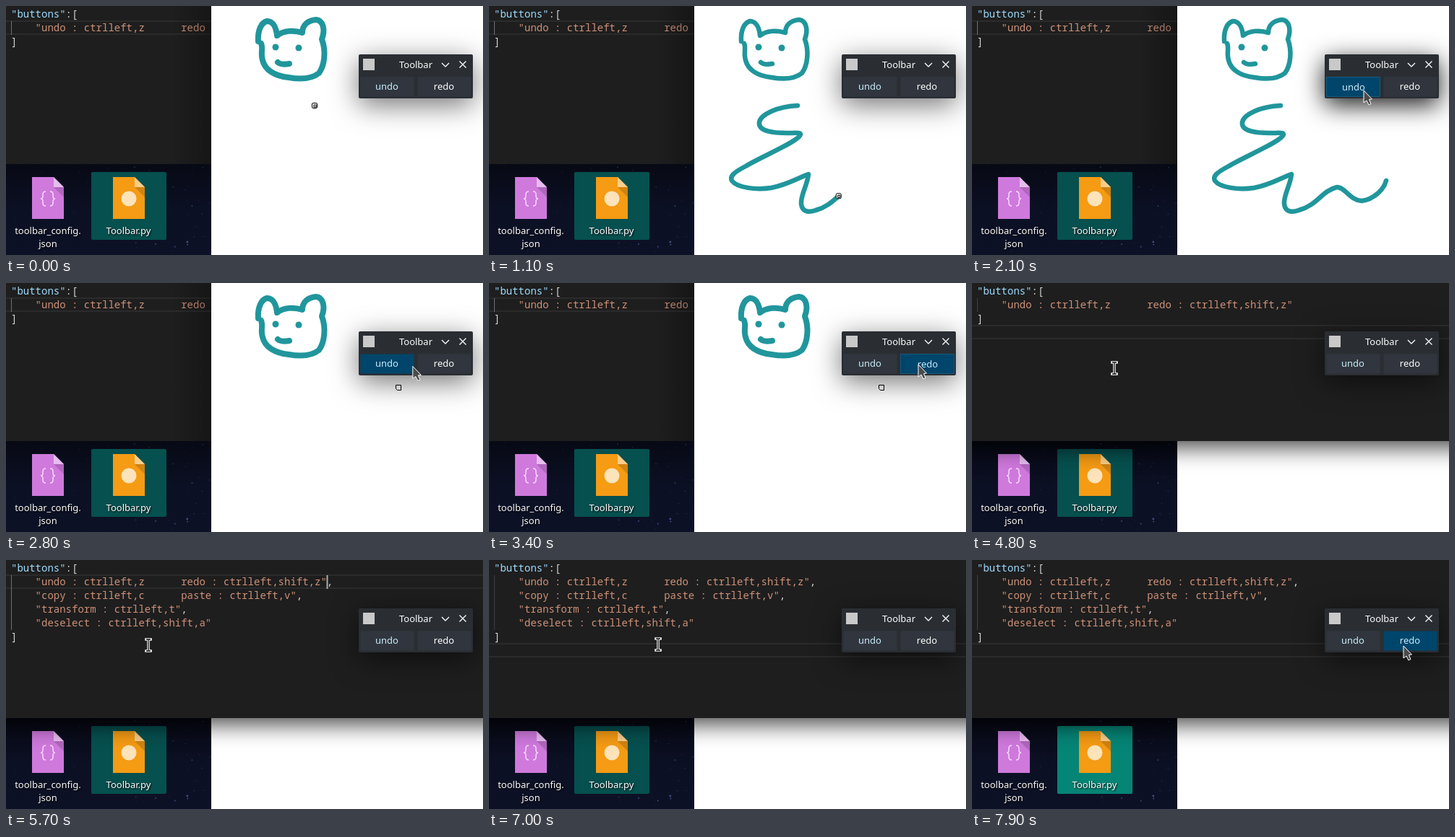
Write an HTML page that moves like this. It is 660x345 px and loops after 8000 ms.

```html
<!DOCTYPE html>
<html lang="en">
<head>
<meta charset="utf-8">
<title>Toolbar demo</title>
<style>
  html, body { margin: 0; width: 100%; height: 100%; overflow: hidden; background: #fff; }
  svg { display: block; }
  text { font: 13px "Noto Sans", sans-serif; fill: #fcfcfc; text-anchor: middle; }
  #code text { font: 14px "Noto Sans Mono", monospace; fill: #d4d4d4; text-anchor: start; white-space: pre; }
  #code .key { fill: #9cdcfe; }
  #code .str { fill: #ce9178; }
  .ink { fill: none; stroke: #20969c; stroke-linecap: round; stroke-linejoin: round; }
  .label { filter: drop-shadow(1px 1px 1px #000); }
  .button rect { fill: #31363e; }
  .button.hover rect { fill: #00456b; }
  .button.pressed rect { stroke: #1679ae; stroke-dasharray: 1 1; }
  .button.pressed text { transform: translate(1px, 1px); }
  .button.hover text, #undo text { fill: #c8ecfa; }
</style>
</head>
<body>
<svg id="stage" width="660" height="345" viewBox="0 0 660 345">
  <defs>
    <linearGradient id="night" x2="0" y2="1">
      <stop stop-color="#070914"/><stop offset=".5" stop-color="#0c1024"/><stop offset="1" stop-color="#0d1126"/>
    </linearGradient>
    <linearGradient id="edge">
      <stop stop-color="#000" stop-opacity="0"/><stop offset="1" stop-color="#000" stop-opacity=".28"/>
    </linearGradient>
    <g id="file">
      <path d="M0 0H30L44 14V58H0Z"/>
      <path d="M30 14H44V28Z" fill="#000" opacity=".15"/>
      <path d="M30 0L44 14H30Z" fill="#fff" opacity=".5"/>
    </g>
  </defs>

  <g id="desktop">
    <rect y="219" width="284" height="126" fill="url(#night)"/>
    <g id="stars" fill="#5d6db0"></g>
    <rect id="selected" x="118" y="230" width="104" height="94" rx="2"/>
    <use href="#file" x="36" y="237" fill="#cf79dd"/>
    <path d="M55 257q-4 0-4 4v2q0 4-3 4q3 0 3 4v2q0 4 4 4M61 257q4 0 4 4v2q0 4 3 4q-3 0-3 4v2q0 4-4 4" fill="none" stroke="#f6dcf9" stroke-width="1.5"/>
    <use href="#file" x="148" y="237" fill="#f59b14"/>
    <circle cx="170" cy="267" r="10.5" fill="#fce3b9"/>
    <g class="label">
      <text x="58" y="316">toolbar_config.</text>
      <text x="58" y="334">json</text>
      <text x="169.500" y="316">Toolbar.py</text>
    </g>
  </g>

  <g id="editor">
    <rect id="pane" x="-60" y="-60" width="780" height="279" fill="#1e1e1e"/>
    <path id="current" d="M0 0H660M0 18H660" stroke="#2b2b2b" stroke-width="2"/>
    <path id="guide" stroke="#404040"/>
    <g id="code"></g>
    <path id="caret" d="M444.500 21V40" stroke="#aeafad" stroke-width="2"/>
  </g>

  <g id="paper">
    <rect x="230" width="54" height="219" fill="url(#edge)"/>
    <rect x="284" width="376" height="345" fill="#fff"/>
    <g id="face" class="ink">
      <path d="M349 49C348 34 353 23 361 21C370 21 374 31 375 41C384 34 398 33 410 37C410 26 418 20 429 19C439 20 442 33 437 46C443 62 441 82 433 93C423 101 408 102 391 99C371 97 358 88 355 75C352 65 356 58 353 52"/>
      <path d="M376 78Q380 82 392 80"/>
      <g fill="#20969c" stroke="none"><circle cx="373" cy="57" r="4.500"/><circle cx="405" cy="58" r="4.500"/></g>
    </g>
    <path id="squiggle" class="ink" stroke-width="6.500" d="M427 138C400 139 376 150 374 161C372 174 395 176 412 176C425 176 431 175 431 178C428 188 380 207 355 222C338 231 333 236 336 242C343 252 370 255 390 252C412 248 428 238 442 233C441 247 431 262 432 274C433 284 440 287 452 283C478 276 484 256 505 251C516 251 523 269 539 270C556 268 570 254 573 242"/>
    <g id="leftover" fill="#fff" stroke="#000"><path d="M539.500 141.500H546.500V148.500H541.500L539.500 146.500Z"/></g>
  </g>

  <g id="toolbar">
    <rect x="488" y="67" width="158" height="61" rx="2" fill="#2a2e33"/>
    <rect x="494" y="73" width="16" height="16" fill="#c9c9c9"/>
    <text x="567" y="86">Toolbar</text>
    <path d="M603 79L608 84L613 79M627.500 76.500L636.500 85.500M636.500 76.500L627.500 85.500" fill="none" stroke="#fcfcfc" stroke-width="1.300"/>
    <g class="button" id="undo"><rect x="490.500" y="98.500" width="74" height="27"/><text x="527" y="116">undo</text></g>
    <g class="button" id="redo"><rect x="569.500" y="98.500" width="74" height="27"/><text x="606" y="116">redo</text></g>
  </g>

  <g id="brush" fill="#fff" stroke="#000"><rect x="-3.500" y="-3.500" width="7" height="7" rx="1.500"/><rect x="-1" y="-1" width="3" height="3"/></g>
  <path id="arrow" d="M0 0V17L4 14L7 20L10 18.500L7.500 12.500L11.500 12Z" fill="#4b4b4b" stroke="#fff"/>
  <g id="beam" fill="none">
    <path d="M-3 -8H3M0 -8V8M-3 8H3" stroke="#fff" stroke-width="3.500" stroke-linecap="square"/>
    <path d="M-3 -8H3M0 -8V8M-3 8H3" stroke="#111" stroke-width="1.300"/>
  </g>
</svg>
<script>
const LOOP = 8000, STEP = 100, LINE = 19;
const $ = id => document.getElementById(id);
const show = (id, on) => { $(id).style.display = on ? "" : "none"; };
const within = (t, ...ranges) => ranges.some(([from, to]) => t >= from && t < to);

// time, x, y of the pointer tip
const pointerPath = [
  [1500, 573, 242], [1700, 542, 117], [2600, 542, 117], [3100, 594, 113], [3600, 594, 113],
  [4000, 537, 113], [4400, 537, 113], [4700, 197, 118], [6400, 197, 118], [6700, 234, 117],
  [7000, 234, 117], [7500, 160, 299], [7600, 160, 299], [7900, 597, 119], [8000, 597, 119],
];

const str = s => `<tspan class="str">"${s}"</tspan>`;
const firstRow = str("undo : ctrlleft,z      redo : ctrlleft,shift,z");
const shortRows = ["    " + firstRow];
const longRows = [
  `    ${firstRow},`,
  `    ${str("copy : ctrlleft,c      paste : ctrlleft,v")},`,
  `    ${str("transform : ctrlleft,t")},`,
  `    ${str("deselect : ctrlleft,shift,a")}`,
];
let shownRows;

function setRows(rows) {
  if (rows === shownRows) return;
  shownRows = rows;
  $("code").innerHTML = ['<tspan class="key">"buttons"</tspan>:[', ...rows, "]"]
    .map((row, i) => `<text x="7" y="${16 + LINE * i}">${row}</text>`).join("");
  $("guide").setAttribute("d", `M7.500 21V${21 + LINE * rows.length}`);
}

function addStars() {
  let seed = 7;
  const random = () => (seed = seed * 16807 % 2147483647) / 2147483647;
  for (let i = 0; i < 90; i++) {
    $("stars").innerHTML += `<circle cx="${random() * 284}" cy="${221 + random() * 123}" r="${.4 + random() ** 4}" opacity="${.2 + random() * .5}"/>`;
  }
}

function pointerAt(t) {
  const i = Math.max(1, pointerPath.findIndex(p => p[0] >= t));
  const [t0, x0, y0] = pointerPath[i - 1], [t1, x1, y1] = pointerPath[i];
  const k = (t - t0) / (t1 - t0);
  return [x0 + (x1 - x0) * k, y0 + (y1 - y0) * k];
}

const squiggle = $("squiggle"), length = squiggle.getTotalLength();

function render(t) {
  const drawing = t <= 1500;
  const drawn = t <= 900 ? .71 * t / 900 : Math.min(1, .71 + .29 * (t - 900) / 600);
  const undone = t === 0 || within(t, [2400, 3500], [4400, LOOP]);
  const front = t >= 4700;
  const edited = t >= 5700;

  squiggle.style.strokeDasharray = `${drawn * length} ${length * 2}`;
  show("squiggle", !undone);
  $("face").style.strokeWidth = undone ? 8 : 6.500;
  show("leftover", within(t, [2400, 4700]));

  $("stage").insertBefore($("editor"), front ? $("toolbar") : $("paper"));
  $("pane").style.filter = front ? "drop-shadow(0 8px 16px rgba(0,0,0,.75))" : "";
  setRows(edited ? longRows : shortRows);
  const row = t >= 7000 ? 6 : front && !edited ? 3 : 1;
  $("current").setAttribute("transform", `translate(0 ${2 + LINE * row})`);
  $("guide").style.stroke = row === 1 ? "#707070" : "#404040";
  show("caret", within(t, [5700, 6200], [6700, 7000]));

  const [x, y] = drawing ? (p => [p.x, p.y])(squiggle.getPointAtLength(drawn * length)) : pointerAt(t);
  const onToolbar = x > 488 && x < 646 && y > 67 && y < 128;
  const kind = drawing ? "brush" : front && y < 219 && !onToolbar ? "beam" : "arrow";
  for (const id of ["brush", "arrow", "beam"]) show(id, id === kind);
  $(kind).setAttribute("transform", `translate(${x} ${y})`);

  const pressed = within(t, [1900, 2400], [3300, 3600], [4100, 4400]);
  for (const [id, left] of [["undo", 490], ["redo", 569]]) {
    const hover = !drawing && x >= left && x < left + 76 && y >= 98 && y < 127;
    $(id).classList.toggle("hover", hover);
    $(id).classList.toggle("pressed", hover && pressed);
  }
  const active = within(t, [1900, 2400], [3600, 4400]);
  $("toolbar").style.filter = `drop-shadow(0 9px ${active ? 17 : 19}px rgba(0,0,0,${active ? .9 : .55}))`;
  $("selected").style.fill = t >= 7400 ? "#058576" : "#06504f";
}

addStars();
let lastTime;
(function tick() {
  const t = Math.floor(performance.now() % LOOP / STEP) * STEP;
  if (t !== lastTime) render(lastTime = t);
  requestAnimationFrame(tick);
})();
</script>
</body>
</html>
```
